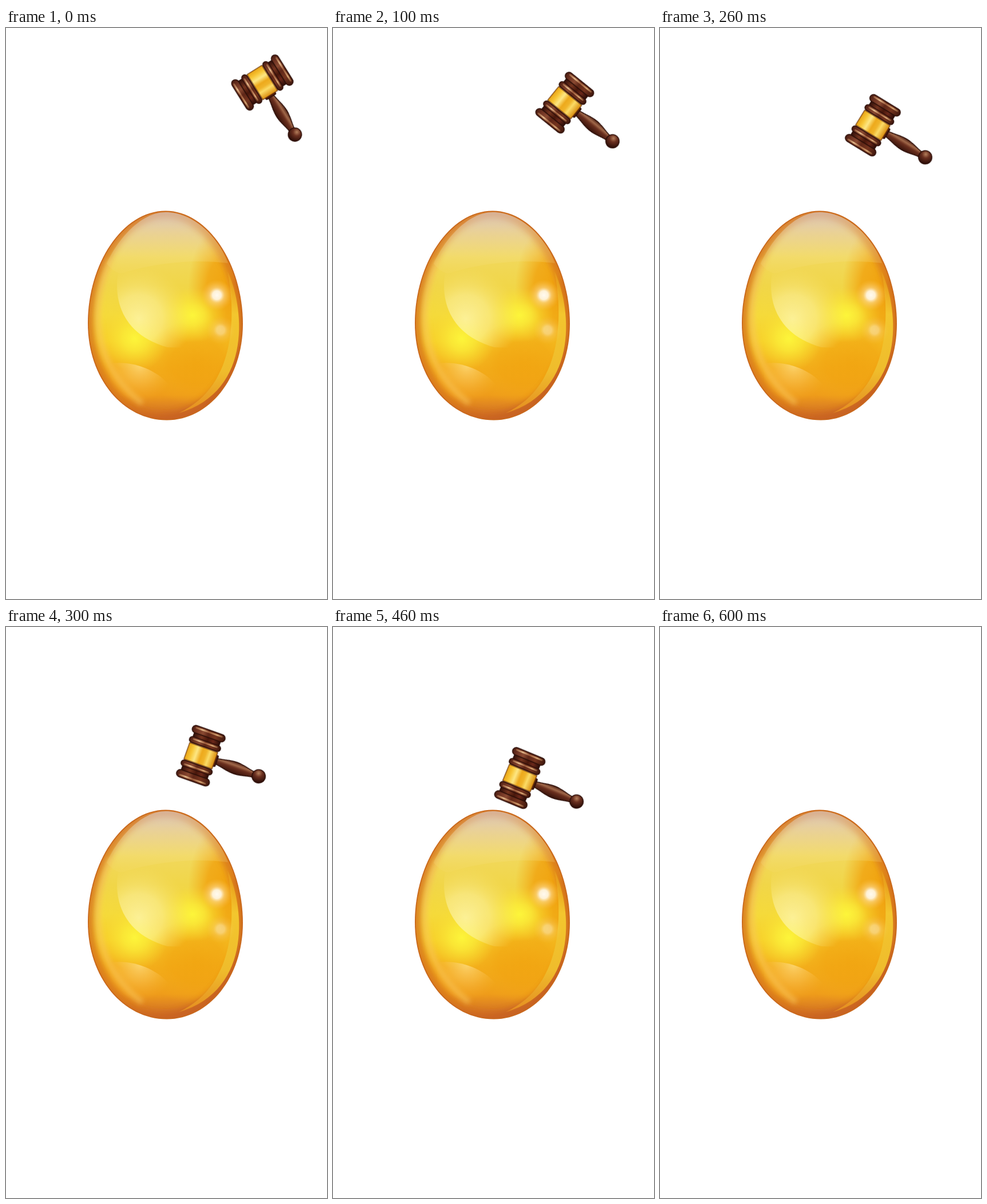
These frames come from a looping animation (561 px wide and 998 px high, 700 ms). An HTML page:

```html
<!DOCTYPE html>
<html lang="en">
<head>
<meta charset="utf-8">
<title>Golden egg and gavel</title>
<style>
  html, body { margin: 0; width: 100%; height: 100%; overflow: hidden; background: #fff; }
  svg { display: block; width: 561px; height: 998px; }

  /* Poses are held, then switched hard. */
  #egg { transform-origin: 0 685.5px; animation: squash 700ms step-end infinite; }
  #gavel { animation: swing 700ms step-end infinite; }

  @keyframes squash {
    0% { transform: none; }
    71.428% { transform: scaleY(.9645); }
    85.714% { transform: none; }
  }
  @keyframes swing {
    0% { transform: translate(448px, 95.3px) rotate(58deg); visibility: visible; }
    14.285% { transform: translate(405px, 130.5px) rotate(39deg); }
    28.571% { transform: translate(372px, 170px) rotate(31.5deg); }
    42.857% { transform: translate(340.5px, 225px) rotate(19.6deg); }
    57.142% { transform: translate(326.5px, 264px) rotate(22.5deg); }
    71.428% { transform: translate(319.5px, 293px) rotate(22.5deg); visibility: visible; }
    85.714%, 100% { transform: translate(319.5px, 293px) rotate(22.5deg); visibility: hidden; }
  }
</style>
</head>
<body>
<svg viewBox="0 0 561 998" xmlns="http://www.w3.org/2000/svg">
  <defs>
    <path id="shell" d="M279 319.5C353 319.5 414 413 414 517C414 612 355 685.5 281 685.5C205 685.5 143 613 143 516C143 413 203 319.5 279 319.5Z"/>
    <clipPath id="inShell"><use href="#shell"/></clipPath>

    <linearGradient id="body" x2="0" y2="1">
      <stop offset="0" stop-color="#dcc0a4"/>
      <stop offset=".1" stop-color="#e8cc88"/>
      <stop offset=".22" stop-color="#f1d85c"/>
      <stop offset=".36" stop-color="#f1d648"/>
      <stop offset=".5" stop-color="#f5da3a"/>
      <stop offset=".62" stop-color="#f7cf2a"/>
      <stop offset=".75" stop-color="#f3ae1b"/>
      <stop offset=".88" stop-color="#ef9c1a"/>
      <stop offset="1" stop-color="#c9642a"/>
    </linearGradient>
    <radialGradient id="yellow">
      <stop offset="0" stop-color="#fdf53a"/>
      <stop offset=".35" stop-color="#fbee38" stop-opacity=".75"/>
      <stop offset="1" stop-color="#f8dc30" stop-opacity="0"/>
    </radialGradient>
    <radialGradient id="amber">
      <stop offset="0" stop-color="#f1a30f"/>
      <stop offset=".5" stop-color="#f1a411" stop-opacity=".85"/>
      <stop offset="1" stop-color="#f2ac1a" stop-opacity="0"/>
    </radialGradient>
    <radialGradient id="spark">
      <stop offset="0" stop-color="#fffaf0"/>
      <stop offset=".28" stop-color="#fff5e0" stop-opacity=".95"/>
      <stop offset=".5" stop-color="#ffe2a8" stop-opacity=".5"/>
      <stop offset="1" stop-color="#ffc85c" stop-opacity="0"/>
    </radialGradient>
    <linearGradient id="sheen" x2="0" y2="1">
      <stop offset="0" stop-color="#d8c8c8" stop-opacity=".65"/>
      <stop offset=".35" stop-color="#ecd8a8" stop-opacity=".42"/>
      <stop offset=".7" stop-color="#f6e49a" stop-opacity=".26"/>
      <stop offset="1" stop-color="#f6dc70" stop-opacity=".14"/>
    </linearGradient>
    <radialGradient id="moon" gradientUnits="userSpaceOnUse" cx="232" cy="508" r="92">
      <stop offset="0" stop-color="#fffbd0" stop-opacity=".62"/>
      <stop offset=".45" stop-color="#fdf6b8" stop-opacity=".46"/>
      <stop offset="1" stop-color="#f6e070" stop-opacity="0"/>
    </radialGradient>
    <radialGradient id="leaf" gradientUnits="userSpaceOnUse" cx="234" cy="590" r="62">
      <stop offset="0" stop-color="#ffe08c" stop-opacity=".7"/>
      <stop offset=".5" stop-color="#fbc65c" stop-opacity=".42"/>
      <stop offset="1" stop-color="#f6b030" stop-opacity="0"/>
    </radialGradient>
    <linearGradient id="crescent" gradientUnits="userSpaceOnUse" x1="0" y1="425" x2="0" y2="675">
      <stop offset="0" stop-color="#eba51c" stop-opacity=".5"/>
      <stop offset=".3" stop-color="#f3c62e"/>
      <stop offset=".7" stop-color="#efbc2c"/>
      <stop offset="1" stop-color="#e58c20"/>
    </linearGradient>
    <filter id="soft" x="-30%" y="-30%" width="160%" height="160%"><feGaussianBlur stdDeviation="6"/></filter>
    <filter id="faint" x="-30%" y="-30%" width="160%" height="160%"><feGaussianBlur stdDeviation="4"/></filter>

    <linearGradient id="wood">
      <stop offset="0" stop-color="#4b1d12"/>
      <stop offset=".16" stop-color="#6f3322"/>
      <stop offset=".34" stop-color="#8a4a32"/>
      <stop offset=".5" stop-color="#5e2617"/>
      <stop offset=".72" stop-color="#76351f"/>
      <stop offset="1" stop-color="#3f170d"/>
    </linearGradient>
    <linearGradient id="drum">
      <stop offset="0" stop-color="#32100a"/>
      <stop offset=".3" stop-color="#74341f"/>
      <stop offset=".55" stop-color="#48170b"/>
      <stop offset=".75" stop-color="#6b281a"/>
      <stop offset="1" stop-color="#2b0d07"/>
    </linearGradient>
    <linearGradient id="shine">
      <stop offset="0" stop-color="#c89060" stop-opacity=".5"/>
      <stop offset=".25" stop-color="#edc796"/>
      <stop offset=".5" stop-color="#b06d46" stop-opacity=".8"/>
      <stop offset=".8" stop-color="#dfb17c"/>
      <stop offset="1" stop-color="#b98355" stop-opacity=".5"/>
    </linearGradient>
    <linearGradient id="gold">
      <stop offset="0" stop-color="#e9a416"/>
      <stop offset=".17" stop-color="#f8c636"/>
      <stop offset=".33" stop-color="#fde784"/>
      <stop offset=".5" stop-color="#eda91c"/>
      <stop offset=".64" stop-color="#f0b42a"/>
      <stop offset=".76" stop-color="#fbdb66"/>
      <stop offset="1" stop-color="#d98c0e"/>
    </linearGradient>
    <linearGradient id="grip" x2="0" y2="1">
      <stop offset="0" stop-color="#4a1d12"/>
      <stop offset=".28" stop-color="#a1694a"/>
      <stop offset=".5" stop-color="#6a2f1e"/>
      <stop offset="1" stop-color="#36120a"/>
    </linearGradient>
    <radialGradient id="knob" cx=".42" cy=".28" r=".7">
      <stop offset="0" stop-color="#b5805c"/>
      <stop offset=".4" stop-color="#6b3020"/>
      <stop offset="1" stop-color="#2c0d07"/>
    </radialGradient>

    <!-- One end of the gavel head, mirrored for the other -->
    <g id="end">
      <rect x="-24" y="-37" width="48" height="12" fill="url(#drum)"/>
      <rect x="-30.2" y="-47.4" width="60.4" height="13" rx="6.5" fill="url(#wood)"/>
      <rect x="-28.6" y="-27" width="57.2" height="10.4" rx="5.2" fill="url(#wood)"/>
      <g fill="url(#shine)" stroke="none">
        <rect x="-25" y="-44.8" width="50" height="2.6" rx="1.3"/>
        <rect x="-23" y="-24.4" width="46" height="2.4" rx="1.2"/>
      </g>
    </g>
  </defs>

  <g id="egg">
    <g clip-path="url(#inShell)">
      <use href="#shell" fill="url(#body)"/>
      <ellipse cx="384" cy="458" rx="66" ry="118" fill="url(#amber)"/>
      <ellipse cx="335" cy="585" rx="95" ry="75" fill="url(#amber)" opacity=".8"/>
      <circle cx="225" cy="543" r="58" fill="url(#yellow)"/>
      <ellipse cx="326" cy="502" rx="60" ry="48" fill="url(#yellow)"/>

      <use href="#shell" fill="none" stroke="#d7761a" stroke-width="24" opacity=".85" filter="url(#soft)"/>
      <path d="M183 405C148 480 146 585 238 656" fill="none" stroke="#f9c860" stroke-width="9" opacity=".6" filter="url(#faint)"/>
      <path d="M146 590C180 700 350 725 414 545L440 710H120Z" fill="#bd5426" opacity=".55" filter="url(#soft)"/>

      <path d="M207 392C184 440 182 530 282 558L345 560L335 395Z" fill="url(#moon)"/>
      <path d="M205 428C255 412 325 403 388 411C370 362 325 322 279 322C235 322 195 370 176 412C190 428 198 430 205 428Z" fill="url(#sheen)"/>
      <path d="M183 586C225 581 266 599 288 627L270 665H180Z" fill="url(#leaf)"/>

      <path d="M396 440C420 505 409 590 345 660L420 660V440Z" fill="#c2581f" opacity=".4" filter="url(#faint)"/>
      <path d="M387 425C414 480 436 634 302 673C408 624 400 490 387 425Z" fill="url(#crescent)"/>
      <circle cx="368.5" cy="467" r="27" fill="url(#spark)"/>
      <circle cx="375" cy="528" r="25" fill="url(#spark)" opacity=".45"/>
      <use href="#shell" fill="none" stroke="#c9681c" stroke-width="3.4"/>
    </g>
  </g>

  <g id="gavel" stroke="#2b0d07" stroke-width="1.6" stroke-linejoin="round">
    <path d="M27 -5C42 -6 49 -10.5 64 -10.5C79 -10 87 -5.5 98 -5V5C87 5.5 79 10 64 10.5C49 10.5 42 6 27 5Z" fill="url(#grip)"/>
    <circle cx="107.3" cy="0" r="11.7" fill="url(#knob)"/>
    <rect x="24" y="-10" width="5.5" height="20" rx="2" fill="#4a1a0e"/>
    <use href="#end"/>
    <use href="#end" transform="scale(1 -1)"/>
    <rect x="-26" y="-15.2" width="52" height="30.4" fill="url(#gold)" stroke="#6b3208" stroke-width="1.2"/>
  </g>
</svg>
</body>
</html>
```
